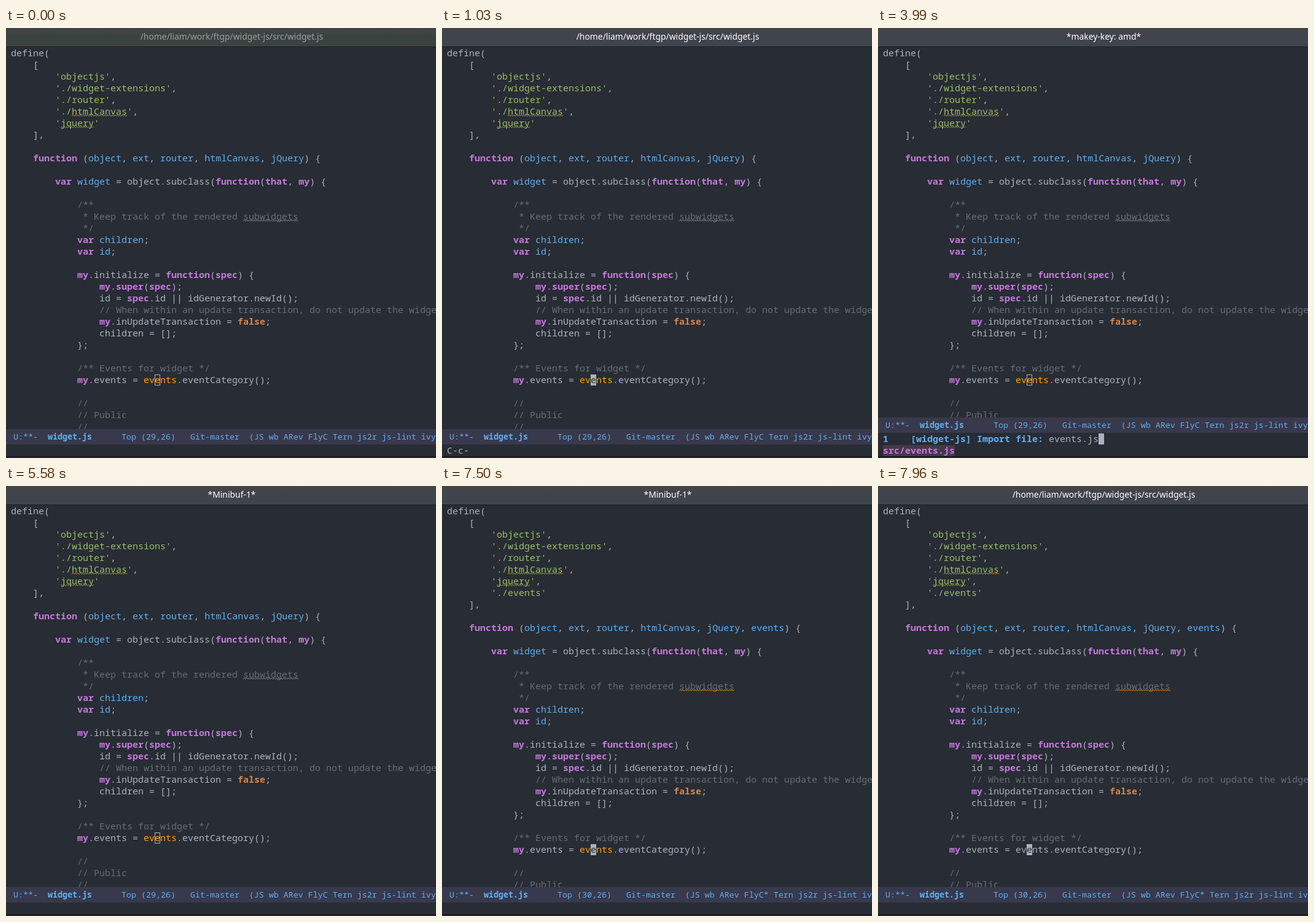
Write an HTML page that moves like this. It is 700x700 px and loops after 8000 ms.

```html
<!DOCTYPE html>
<html lang="en">
<head>
<meta charset="utf-8">
<title>widget.js</title>
<style>
  html, body { margin: 0; width: 100%; height: 100%; overflow: hidden; background: #282c34; }
  #stage { position: relative; width: 700px; height: 700px; overflow: hidden; background: #282c34; color: #abb2bf; }
  #stage > * { position: absolute; left: 0; width: 700px; margin: 0; overflow: hidden; box-sizing: border-box; }
  pre { font: 500 15px/19px "Noto Sans Mono", monospace; padding-left: 8px; font-variant-ligatures: none; }
  .title {
    top: 0; height: 31px; border-bottom: 1px solid #1d2026;
    background: linear-gradient(#444546, #40444d 40%);
    font: 500 13.9px/27px "Noto Sans", sans-serif; color: #fff;
  }
  .title span { position: absolute; left: 367.5px; transform: translateX(-50%); white-space: pre; }
  .title.dim { background: linear-gradient(#424645, #3b4341 40%); color: #9a9f9e; }
  .bar { height: 25px; padding-left: 12px; font-size: 13.333px; line-height: 25px; background: #38394c; color: #61afef; }
  .bar.off { background: #212225; color: #abb2bf; }
  .head { padding-left: 4px; }
  .edge { top: 697px; height: 2px; background: #1b1d22; }
  b { color: #c678dd; }
  .bar b { color: inherit; }
  u { color: #61afef; text-decoration: none; }
  b u, .key { color: #61afef; font-weight: bold; }
  i { color: #676c77; font-style: normal; }
  s { color: #98be65; text-decoration: none; }
  em { color: #da8548; font-style: normal; font-weight: bold; }
  .free { color: #ff9f0f; }
  .cur, .hollow, .pick { display: inline-block; height: 18px; margin-top: 1px; line-height: 17px; vertical-align: top; }
  .cur { background: #abb2bf; color: #282c34; min-width: 9px; }
  .hollow { box-shadow: inset 0 0 0 1px #abb2bf; }
  .pick { background: #48384c; }
  .wavy { position: relative; }
  .wavy svg { position: absolute; left: 0; top: 16px; overflow: visible; }
</style>
</head>
<body>
<div id="stage"></div>
<script>
const stage = document.getElementById('stage');
const PATH = '/home/liam/work/ftgp/widget-js/src/widget.js';
const MENU = '*makey-key: amd*', MINI = '*Minibuf-1*';
const ORANGE = '#f0900f', OLIVE = '#a09a50', GREY = '#9a8f86';

const wavy = (word, color) => {
  let d = 'M0 2.5';
  for (let x = 2; x <= word.length * 9; x += 2) d += `L${x} ${x % 4 ? 0.5 : 2.5}`;
  return `<span class="wavy">${word}<svg width="1" height="3"><path d="${d}" fill="none" stroke="${color}"/></svg></span>`;
};

// added: the new dependency is in place; free: "events" is marked as undeclared
const code = ({ added, free, solid }) => `define(
    [
        <s>'objectjs'</s>,
        <s>'./widget-extensions'</s>,
        <s>'./router'</s>,
        <s>'./${wavy('htmlCanvas', ORANGE)}'</s>,
        <s>'${wavy('jquery', OLIVE)}'</s>${added ? ",\n        <s>'./events'</s>" : ''}
    ],

    <b>function</b> (<u>object</u>, <u>ext</u>, <u>router</u>, <u>htmlCanvas</u>, <u>jQuery</u>${added ? ', <u>events</u>' : ''}) {

        <b>var</b> <u>widget</u> = object.subclass(<b>function</b>(<b>that</b>, <b>my</b>) {

            <i>/**</i>
            <i> * Keep track of the rendered ${wavy('subwidgets', added ? ORANGE : GREY)}</i>
            <i> */</i>
            <b>var</b> <u>children</u>;
            <b>var</b> <u>id</u>;

            <b>my</b>.initialize = <b>function</b>(<b>spec</b>) {
                <b>my</b>.<b>super</b>(<b>spec</b>);
                id = <b>spec</b>.id || idGenerator.newId();
                <i>// When within an update transaction, do not update the widget</i>
                <b>my</b>.inUpdateTransaction = <em>false</em>;
                children = [];
            };

            <i>/** Events for widget */</i>
            <b>my</b>.events = <span class="${free ? 'free' : ''}">ev<span class="${solid ? 'cur' : 'hollow'}">e</span>nts</span>.eventCategory();

            <i>//</i>
            <i>// Public</i>
            <i>//</i>

            <i>/**</i>
            <i> * Returns a unique id for the widget</i>
            <i> *</i>`;

const key = (k, text) => ` <span class="key">${k}</span>: ${text}`;
const menu = [
  '<b>Switches</b>',
  key('-r', 'Import using relative paths (files only) (amd-always-use-relative-file-name'),
  ')',
  '<b>Dependencies Actions</b>',
  key('<span class="cur">k</span>', 'Kill buffer module'),
  key('f', 'Import file'),
  key('m', 'Import module name'),
  key('r', 'Rename file and update dependencies'),
  '<b>Search Actions</b>',
  key('o', 'Find module at point   ') + key('s', 'Search references'),
  '<b>Auto insert Actions</b>',
  key('a', 'Auto insert')
].join('\n');

const pane = (top, bottom, html) => `<pre style="top:${top}px;height:${bottom - top}px">${html}</pre>`;
const bar = (top, html, cls = '') => `<pre class="bar ${cls}" style="top:${top}px">${html}</pre>`;
const title = (text, dim) => `<div class="title ${dim ? 'dim' : ''}"><span>${text}</span></div>`;
const curl = y => `<svg style="top:${y}px;width:8px" height="8"><path fill="#abb2bf" d="M2 0H6V2H2V3H3V4H5V3H6V8H1V7H2V6H1V5H0V2H1V1H2Z"/></svg>`;
const edge = '<div class="edge"></div>';

const status = (pos, fly = 'FlyC') =>
  `U:**-  <b>widget.js</b>${pos.padStart(17)}   Git-master  (JS wb ARev ${fly} Tern js2r js-lint ivy Abbrev)`;

const editor = ({ name = PATH, dim, split = 653, echo = '', fly, ...opts }) =>
  title(name, dim) +
  pane(31, split, code({ free: true, ...opts })) +
  bar(split, status(opts.added ? 'Top (30,26)' : 'Top (29,26)', fly)) +
  pane(split + 25, 697, echo) + edge;

const popup = () =>
  title(MENU) +
  pane(31, 368, code({ free: true }).split('\n').slice(19).join('\n')) +
  bar(368, status('4% (29,26)'), 'off') +
  bar(393, 'AMD module helpers', 'off head') +
  pane(418, 634, menu) + curl(461) +
  bar(634, 'U:%*-  <b>*makey-key: amd*</b>   All (4,1)      (makey-key-mode ivy Abbrev)') +
  pane(659, 697, 'Type a prefix key to toggle it. Run ’actions’ with their prefixes. ’?’ for more\nhelp.') +
  curl(683) + edge;

const caret = '<span class="cur"> </span>';
const finder = {
  split: 634,
  echo: `<b><u>1    [widget-js] Import file: </u></b>events.js${caret}\n<b class="pick">src/events.js</b>`
};
const done = { added: true, solid: true, fly: 'FlyC*' };

const scenes = [
  [0, editor({ dim: true })],
  [520, editor({ solid: true })],
  [1030, editor({ solid: true, echo: 'C-c-' })],
  [2040, popup()],
  [3990, editor({ name: MENU, ...finder })],
  [4040, editor({ name: MINI, ...finder })],
  [5580, editor({ name: MINI })],
  [5630, editor({ name: MINI, echo: `<b><u>Import as (events): </u></b>${caret}` })],
  [7500, editor({ ...done, name: MINI })],
  [7550, editor(done)],
  [7700, editor({ ...done, free: false })],
  [7800, editor({ ...done, free: false, fly: 'FlyC' })],
  [7960, editor({ ...done, free: false })]
];

let shown;
function frame() {
  const t = performance.now() % 8000;
  const scene = scenes.findLast(([start]) => start <= t);
  if (scene !== shown) {
    shown = scene;
    stage.innerHTML = scene[1];
  }
  requestAnimationFrame(frame);
}
frame();
</script>
</body>
</html>
```
